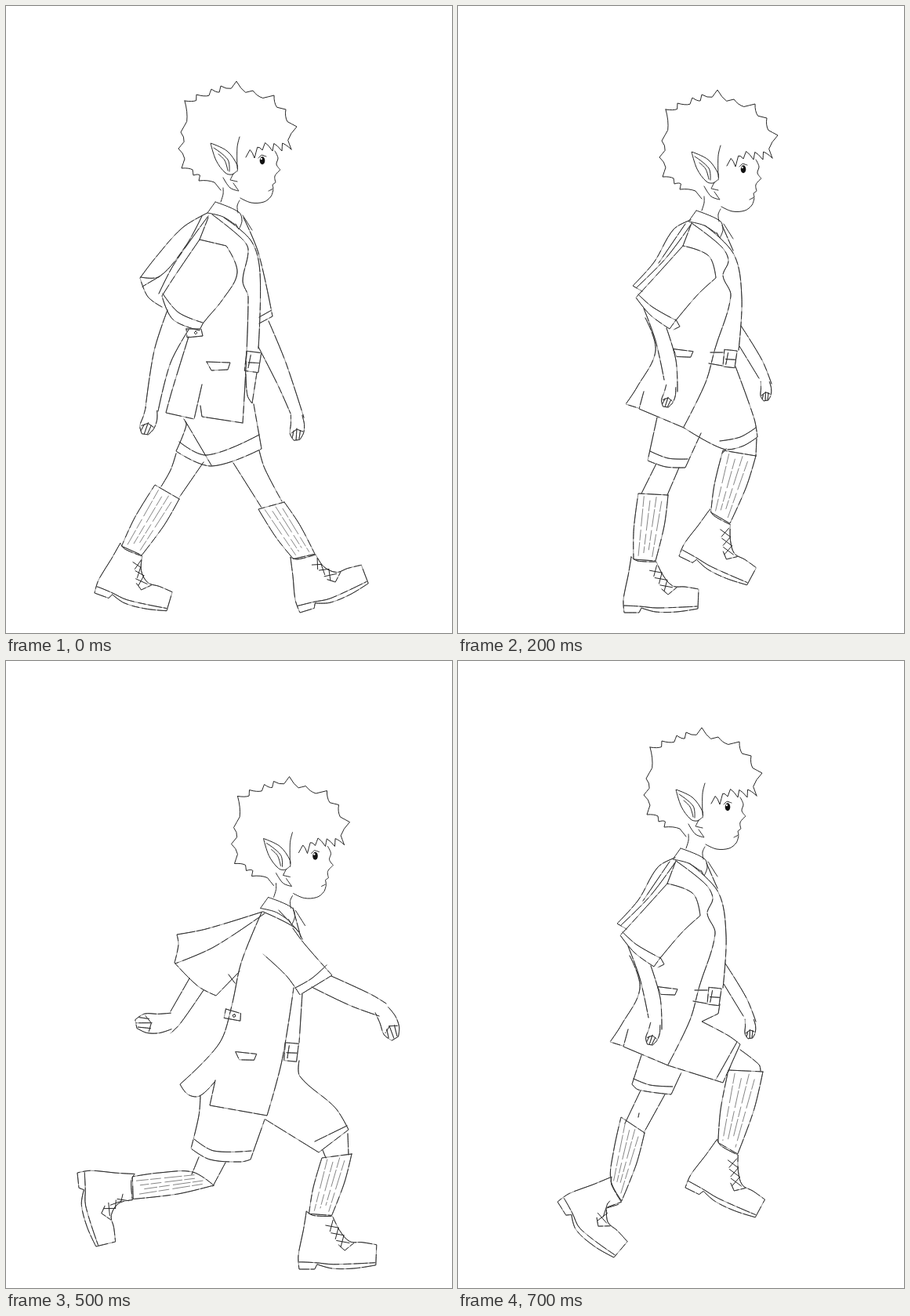
These frames come from a looping animation (569 px wide and 800 px high, 800 ms). An HTML page:

```html
<!DOCTYPE html>
<html lang="en">
<head>
<meta charset="utf-8">
<title>Walk cycle</title>
<style>
html, body { margin: 0; width: 100%; height: 100%; overflow: hidden; background: #fff; }
svg { display: block; width: 100%; height: 100%; }
path { fill: none; stroke-linecap: round; stroke-linejoin: round; }
.soft { stroke: #777; stroke-width: .85; }
.firm { stroke: #2b2b2b; stroke-width: 1; stroke-dasharray: 17 3 31 6 9 4; }
.ink { stroke: #262626; stroke-width: 1; }
.rib { stroke: #666; stroke-width: .8; stroke-dasharray: 13 3 22 5; }
</style>
</head>
<body>
<svg id="stage" viewBox="0 0 569 800"></svg>
<script>
let art = '';

const mix = (a, b, t) => [a[0] + (b[0] - a[0]) * t, a[1] + (b[1] - a[1]) * t];
const line = (a, b) => `M${a}L${b}`;
const addPath = (cls, d) => { art += `<path class="${cls}" d="${d}"/>`; };

// Strokes are "x y x y ..." points, separated by "/".
function points(text) {
  const n = text.trim().split(/\s+/).map(Number);
  return n.filter((_, i) => i % 2 === 0).map((x, i) => [x, n[2 * i + 1]]);
}

// Smooth line through the points; sharp turns stay sharp.
function curve(p) {
  const tangent = p.map((b, i) => {
    const a = p[i - 1], c = p[i + 1];
    if (!a || !c) return [0, 0];
    const turn = Math.atan2(c[1] - b[1], c[0] - b[0]) - Math.atan2(b[1] - a[1], b[0] - a[0]);
    const l = Math.hypot(c[0] - a[0], c[1] - a[1]);
    return Math.cos(turn) < .6 || !l ? [0, 0] : [(c[0] - a[0]) / l, (c[1] - a[1]) / l];
  });
  let d = 'M' + p[0];
  for (let i = 1; i < p.length; i++) {
    const a = p[i - 1], b = p[i], s = tangent[i - 1], e = tangent[i];
    const k = Math.hypot(b[0] - a[0], b[1] - a[1]) / 3;
    const c1 = [a[0] + s[0] * k, a[1] + s[1] * k], c2 = [b[0] - e[0] * k, b[1] - e[1] * k];
    d += 'C' + [...c1, ...c2, ...b].map(v => v.toFixed(1)).join(' ');
  }
  return d;
}

const strokes = (text, map = p => p) => text.split('/').map(t => curve(points(t).map(map))).join('');
const pencil = d => { addPath('soft', d); addPath('firm', d); };
const sketch = text => pencil(strokes(text));

// Moves a local point to (x, y); beyond the ball of the foot it may bend.
function frame(x, y, deg = 0, size = 1, bend = 0) {
  const turn = ([px, py], a) => {
    const c = Math.cos(a * Math.PI / 180), s = Math.sin(a * Math.PI / 180);
    return [px * c - py * s, px * s + py * c];
  };
  return p => {
    if (bend && p[0] > 45) {
      const q = turn([p[0] - 45, p[1] + 10], bend);
      p = [q[0] + 45, q[1] - 10];
    }
    const q = turn(p, deg);
    return [x + q[0] * size, y + q[1] * size];
  };
}
const stamp = shape => (...place) => pencil(strokes(shape, frame(...place)));

const pocket = stamp('-15 -5 15 -4 12 5 -9 6 -15 -5');
const tab = stamp('-10 -5 9 -5 11 4 -9 6 -10 -5/2 -2 4 0 2 2 0 0 2 -2');
const buckle = stamp('-8 -12 9 -11 7 12 -9 11 -8 -12/-6 1 7 1/-5 8 -3 -8');
const fist = stamp('0 -7 12 -10 24 -9 33 -4 34 4 25 9 12 8 0 8/20 -5 32 -3/18 0 33 1/21 4 30 6/22 -8 19 0 24 7');

// Pointed locks of hair between tips, each pulled in towards (cx, cy).
function locks(text, cx, cy, depth) {
  const tips = points(text);
  let d = 'M' + tips[0];
  for (let i = 1; i < tips.length; i++) {
    const a = tips[i - 1], b = tips[i], m = mix(a, b, .62);
    const far = Math.hypot(cx - m[0], cy - m[1]);
    const dip = mix(m, [cx, cy], depth / far), bow = mix(a, dip, .5);
    d += `Q${mix(bow, [cx, cy], 3 / far)} ${dip}Q${mix(dip, b, .45)} ${b}`;
  }
  return d;
}

function head(x, y) {
  art += `<g transform="translate(${x} ${y})">`;
  addPath('ink', locks('228 121 223 161 220 182 224 207 239 216 246 223 274 235', 295, 165, 6)
    + locks('228 121 243 113 262 106 274 102 294 96 315 108 342 114 357 132 371 154 364 183', 295, 165, 7)
    + locks('364 183 352 185 340 185 327 184 317 194 306 193', 320, 100, 10));
  addPath('ink', strokes('298 167 295 180 295 207/277 219 286 232 297 236 290 226/290 214 286 222 295 224'));
  addPath('ink', strokes(`343 185 347 194 345 202 350 209 343 217 344 225 340 228 341 233 335 236
    /341 234 338 243 329 250 313 251 299 245/277 232 277 240 274 250/298 248 295 255 296 264/322 194 326 190 332 192`));
  addPath('ink', strokes(`295 211 295 203 282 185 261 175 268 197 280 213 288 215 294 211
    /265 181 283 196 285 211/271 189 279 197 283 210`));
  addPath('ink', strokes('267 250 257 264 277 269 295 281/267 250 297 263 301 274 297 285 293 278/302 267 314 286'));
  art += '<ellipse cx="327" cy="197.3" rx="3.3" ry="5" fill="#111"/><circle cx="325.8" cy="195" r="1.2" fill="#fff"/></g>';
}

function laces(map) {
  const a = [37, -57], b = [57, -29], n = [4.5, -3.2];
  const at = (t, side) => {
    const m = mix(a, b, t);
    return map([m[0] + n[0] * side, m[1] + n[1] * side]);
  };
  let d = '';
  for (let i = 0; i < 3; i++) {
    d += line(at(i / 3, -1), at((i + 1) / 3, 1)) + line(at(i / 3, 1), at((i + .8) / 3, -1));
  }
  addPath('ink', d);
}

// Sock from its two top corners down into a boot placed by its heel.
function leg(ax, ay, bx, by, ...boot) {
  const map = frame(...boot);
  const a = [ax, ay], b = [bx, by], c = map([40, -66]), d = map([12, -68]);
  const bow = (p, q) => {
    const m = mix(p, q, .45);
    return [m[0] - (p[1] - q[1]) * .03, m[1] - (q[0] - p[0]) * .03];
  };
  pencil(curve([b, bow(b, c), c, d, bow(d, a), a, b]));
  addPath('rib', [.2, .42, .62, .82].map((t, i) => {
    const top = mix(a, b, t), foot = mix(d, c, t);
    return line(mix(top, foot, .04 + i % 2 * .06), mix(top, foot, .94 - i % 3 * .05));
  }).join(''));
  pencil(strokes(`9 -71 5 -47 -1 -17 0 0 19 0 22 -6 40 -1 67 -1 94 -5 95 -30 77 -33 62 -34 50 -47 41 -65 17 -66 9 -71
    /0 -9 20 -8 42 -6 93 -8/48 -30 56 -23 67 -32`, map));
  laces(map);
}

function liftTorso() {
  head(17, -11);
  sketch('277 251 255 263 230 305 203 335 215 342/277 257 245 300 208 337/270 256 236 306');
  sketch('267 284 278 255/278 255 316 285 325 303 318 322 328 348 308 415 296 458 268 515/295 258 332 295 342 350 338 417/317 258 331 290');
  sketch('219 376 232 418 208 465 194 486 210 491/217 470 211 492 268 516/258 378 263 387 255 391');
  sketch('267 284 230 325 207 350 225 372 250 390 258 379 287 345 309 325 300 297 267 284/210 346 228 362 258 379');
  sketch('217 364 232 405 243 455/246 389 258 430 260 470/339 412 364 453/341 386 368 430 380 460/302 420 318 420/300 434 317 437');
  fist(252, 463, 105, .82);
  fist(372, 457, 88, .73);
  pocket(267, 421, 5, .85);
  buckle(327, 428, 3, .95);
}

const poses = {
  contact() {
    head(0, 0);
    sketch('257 264 225 283 190 322 171 347 181 371 199 384/172 346 196 345 230 305 250 268/196 345 174 358/258 268 214 330 195 367');
    sketch('247 298 258 270/263 266 300 296 309 311 302 351 309 372 302 532/278 270 313 300 324 340 322 437');
    sketch('233 422 212 490 204 519 240 527 250 483/248 510 250 524 302 532/303 270 322 315 340 396 323 405/323 397 339 388');
    sketch('247 298 215 345 199 370 213 400 247 414 252 404 276 375 295 340 281 306 247 298/200 367 220 391 251 404');
    sketch('206 388 189 440 178 512/233 413 210 455 194 517/322 435 347 484 363 520/335 402 357 455 380 525');
    sketch('306 470 308 497 314 507 320 468/227 527 230 535 217 568 262 587 326 565 316 508/221 556 256 573 323 547/229 530 262 586');
    sketch('217 571 210 592 198 613/252 582 221 627/290 583 326 640/323 567 330 590 352 632');
    fist(186, 514, 105);
    fist(371, 522, 90, .95);
    tab(240, 417);
    pocket(271, 459);
    buckle(315, 454, 4, 1.1);
    leg(190, 611, 221, 629, 113, 749, 20, 1, -6);
    leg(322, 642, 355, 633, 375, 774, -17, 1, -6);
  },
  down() {
    head(32, 31);
    sketch('290 294 250 306 210 322 183 325 189 360 229 383 260 360/182 328 188 347 235 342 285 311/184 326 235 325 256 322');
    sketch('282 323 291 296/293 295 328 338 328 420 297 530 290 551/302 298 341 330 352 459/327 312 345 342');
    sketch('255 432 229 480 208 521 212 540 265 551 290 551/230 480 205 504 209 520/256 428 262 436 272 431');
    sketch('282 323 245 372 221 402 243 420 280 431 285 419 320 368 314 332 282 323/228 389 250 408 284 420/297 398 315 385 321 366');
    sketch('343 309 373 375 387 409 355 424/354 410 382 402/226 405 200 455 180 488/255 430 220 470 185 493');
    sketch('362 424 405 466 436 490/372 417 420 452 450 488/322 461 337 462/316 487 338 488');
    sketch('256 551 248 585 275 592 302 590 313 558/252 567 280 576 307 578/304 510 322 532/335 540 355 566');
    sketch('350 490 390 542 372 572 337 584 292 551/328 575 352 567 384 537');
    sketch('388 551 415 590 414 622/366 578 391 613/246 585 236 608/278 593 258 626');
    fist(185, 489, 153, 1.5);
    fist(443, 489, 72, 1.4);
    pocket(274, 474, 8, .9);
    buckle(345, 476, -2, 1.1);
    leg(234, 605, 262, 625, 114, 697, 40);
    leg(384, 615, 417, 623, 363, 762);
  },
  pass() {
    liftTorso();
    sketch('234 503 222 558 245 566 270 567 290 523/225 546 248 555 273 556');
    sketch('334 438 358 505 362 528 342 540 318 543 268 516/314 533 340 528 360 516');
    sketch('233 562 214 600/262 567 247 602/361 530 360 552/322 543 318 548');
    leg(210, 600, 248, 602, 192, 752);
    leg(318, 545, 360, 552, 262, 680, 26);
  },
  push() {
    head(36, -2.5);
    sketch('302 250 268 275 243 325 224 345 240 351 253 353/225 345 240 365 253 387/297 262 262 320 240 346/293 258 238 342');
    sketch('286 295 297 263/298 262 338 300 352 346/335 262 352 300 351 346/313 258 335 288 350 335/327 416 322 430/343 411 342 431');
    sketch('286 295 275 335 248 405 218 494 270 505 308 510 320 417/245 460 234 496/241 485 247 500');
    sketch('286 294 300 290 343 333 370 398 345 407 317 416 310 375 294 340/314 403 340 394 367 387');
    sketch('343 412 385 465 405 492/366 400 408 455 421 492');
    sketch('226 498 222 525 209 555 230 570 262 580 302 515/214 541 235 553 265 569/240 525 233 548');
    sketch('341 455 346 470 388 518 395 530 386 545 352 569 335 558 301 515/349 562 384 532 389 521');
    sketch('222 570 203 602/250 580 226 617/395 532 411 560 409 577/372 560 374 571');
    fist(413, 491, 98, 1.25);
    tab(255, 404);
    pocket(284, 449, 8, .8);
    buckle(332, 443, 4);
    leg(203, 598, 226, 616, 114, 711, 44, 1.03);
    leg(376, 570, 411, 576, 281, 677, 33);
  },
  reach() {
    head(32.5, 12);
    sketch('296 264 245 315 220 335 201 341 215 375 250 395/204 339 211 346 237 347/297 270 250 330 213 371/292 270 209 346');
    sketch('292 278 310 284 332 282/295 278 264 348 246 415 220 465 189 502 210 527 220 515');
    sketch('232 494 232 530 302 541/331 380 328 402 317 445 318 470 302 541/343 392 340 447');
    sketch('330 283 345 295 370 345 382 372 338 399 324 355 298 321/333 387 358 374 379 361');
    sketch('360 386 412 425 430 438/378 377 430 412 448 432/211 362 192 415 182 440/228 388 195 445 180 462');
    sketch('212 527 200 585 230 596 275 599 300 542/203 567 225 579 281 583/238 545 230 575');
    sketch('338 468 360 505 384 560 384 575 328 594 301 542/322 500 302 541/327 580 355 575 384 560');
    sketch('213 594 205 617/245 600 229 630/352 590 376 635/383 577 402 625');
    fist(439, 435, 81, 1.45);
    fist(183, 452, 170, 1.35);
    tab(252, 420, 2);
    pocket(271, 464, 7, .85);
    buckle(331, 458, 5);
    leg(197, 614, 230, 632, 69, 692, 68, 1, -25);
    leg(373, 637, 408, 622, 438, 776, -22, 1, -6);
  },
  land() {
    head(67.5, 51.5);
    sketch('327 320 255 342 218 349 220 362 215 385 245 415 268 427 298 396/330 322 265 365 216 386/284 400 292 411');
    sketch('326 321 300 385 288 440 272 488 222 540 232 553 247 555 266 537/267 535 260 567 333 580 352 510 367 417/378 424 374 487');
    sketch('328 320 368 340 378 355/348 318 374 346/366 315 376 352');
    sketch('366 341 380 360 416 401 375 426 358 402 328 374/369 417 390 405 409 388');
    sketch('390 416 440 440 476 453/415 402 465 425 485 437/234 405 210 447/252 420 222 463 210 475');
    sketch('248 555 246 580 236 622 260 636 300 639 312 636 330 585/240 610 265 625 313 625');
    sketch('374 510 375 530 420 570 437 598 399 627 331 585/394 613 435 593');
    sketch('246 633 237 655/280 640 264 670/436 603 437 630/404 624 408 634');
    fist(480, 445, 66, 1.2);
    fist(211, 460, 176, 1.35);
    tab(289, 452, 16, 1.05);
    pocket(306, 504, 4, .9);
    buckle(364, 499, 2);
    leg(238, 652, 265, 669, 91, 653, 84, 1.02, -10);
    leg(403, 634, 441, 629, 374, 776, 0, 1.04);
  },
  lift() {
    liftTorso();
    sketch('234 503 222 540 230 547 272 553 285 525/224 533 245 541 274 543');
    sketch('334 438 332 450 311 460 345 478 360 489 338 538 268 516/356 486 329 534');
    sketch('360 496 384 515 386 523/348 516 344 526/233 548 213 590/264 553 237 602/231 577 230 582');
    leg(208, 582, 238, 602, 127, 690, 58, 1.06, -20);
    leg(345, 522, 389, 524, 290, 672, 26, 1.03);
  }
};

const STEP = 100;
const figures = [];

function addFigure(name, x = 0, y = 0) {
  art = '';
  poses[name]();
  figures.push(`<g transform="translate(${x} ${y})" visibility="hidden">${art}</g>`);
}

addFigure('contact');
addFigure('down');
addFigure('pass', 20, 22);
addFigure('push');
addFigure('reach');
addFigure('land');
addFigure('pass', 32, 24);
addFigure('lift');

const stage = document.getElementById('stage');
stage.innerHTML = figures.join('');
const start = performance.now();

function draw(ms) {
  const now = Math.floor(ms / STEP) % figures.length;
  [...stage.children].forEach((g, i) => g.setAttribute('visibility', i === now ? 'visible' : 'hidden'));
}
function tick() {
  draw(performance.now() - start);
  requestAnimationFrame(tick);
}
draw(0);
requestAnimationFrame(tick);
</script>
</body>
</html>
```
